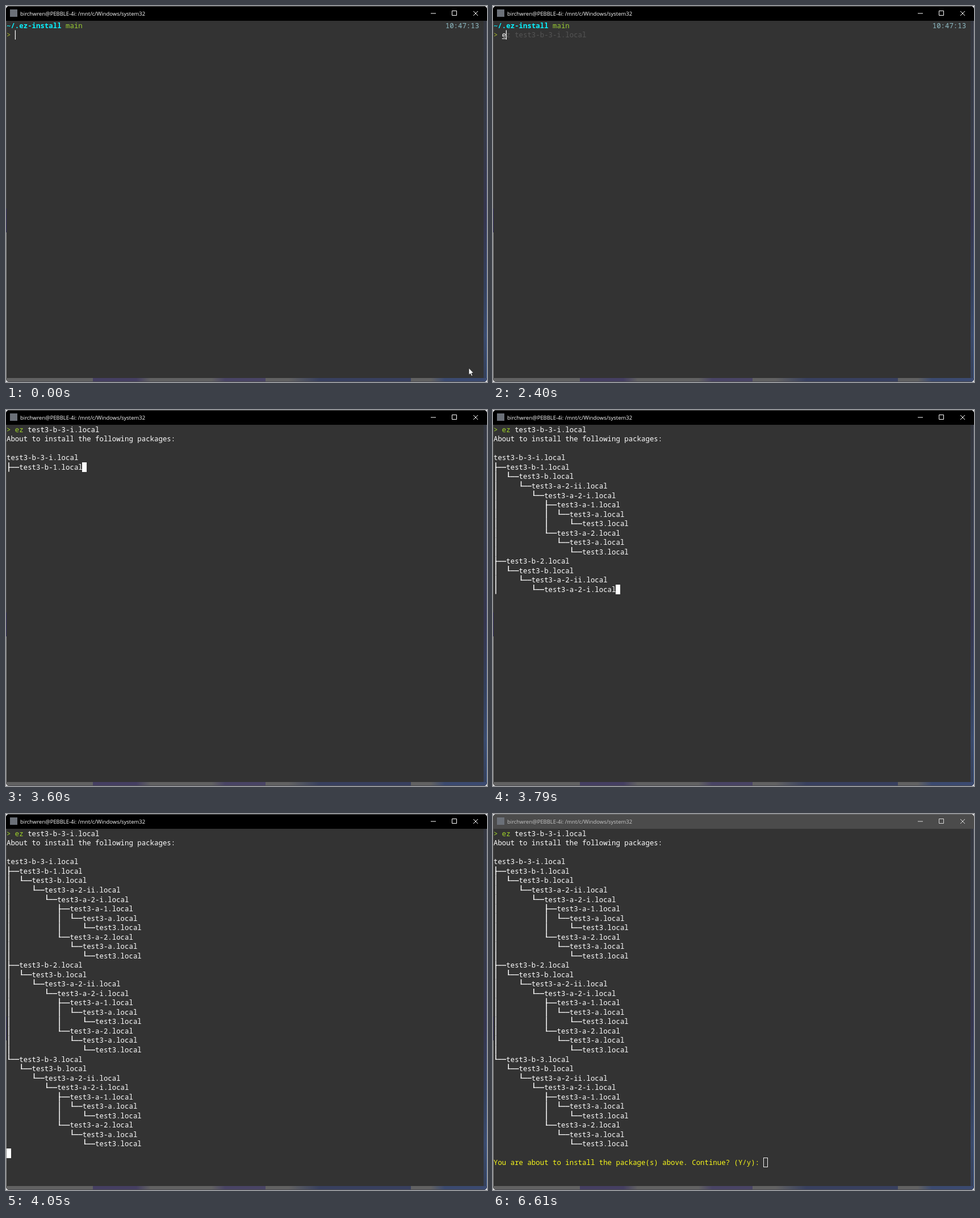
Animation, 847 px wide and 661 px high, one loop 6740 ms. Source, as an HTML page with a canvas:

```html
<!DOCTYPE html>
<html lang="en">
<head>
<meta charset="utf-8">
<title>Terminal</title>
<style>
html, body { margin: 0; width: 100%; height: 100%; overflow: hidden; background: #333; }
canvas { display: block; width: 847px; height: 661px; }
</style>
</head>
<body>
<canvas id="stage" width="847" height="661"></canvas>
<script>
const ctx = document.getElementById('stage').getContext('2d');
const W = 847, H = 661, LOOP = 6740;
const CELL = 7.43, ROW = 16.53, LEFT = 1, TOP = 26;
const MONO = '12.3px "Noto Sans Mono", "DejaVu Sans Mono", monospace';
const SANS = '500 9.45px "Open Sans", "Noto Sans", sans-serif';
const WHITE = '#fff', LIME = '#a2d729', DIM = '#555';

const colX = c => LEFT + c * CELL;
const rowY = r => TOP + r * ROW;

function rect(x, y, w, h, fill) {
  ctx.fillStyle = fill;
  ctx.fillRect(x, y, w, h);
}

function gradient(x0, y0, x1, y1, stops) {
  const g = ctx.createLinearGradient(x0, y0, x1, y1);
  stops.forEach(([at, color]) => g.addColorStop(at, color));
  return g;
}

// Box-drawing characters: does each stem reach below the middle, and does it have an arm?
const BOX = { '│': [1, 0], '├': [1, 1], '└': [0, 1] };

function drawBox(ch, x, y) {
  const mid = y + 8;
  if (ch === '─') return rect(x, mid, CELL, 1.3, WHITE);
  const [below, arm] = BOX[ch];
  const sx = x + 3.2;
  rect(sx, y, 1.5, below ? ROW : 9.3, WHITE);
  if (arm) rect(sx, mid, x + CELL - sx, 1.3, WHITE);
}

function print(text, col, row, color = WHITE, weight = '500') {
  ctx.font = weight + ' ' + MONO;
  [...text].forEach((ch, i) => {
    const x = colX(col + i), y = rowY(row);
    if (ch === '─' || BOX[ch]) return drawBox(ch, x, y);
    ctx.fillStyle = color;
    ctx.fillText(ch, x, y + 12.8);
  });
}

const branch = [
  '└──test3-b.local',
  '   └──test3-a-2-ii.local',
  '      └──test3-a-2-i.local',
  '         ├──test3-a-1.local',
  '         │  └──test3-a.local',
  '         │     └──test3.local',
  '         └──test3-a-2.local',
  '            └──test3-a.local',
  '               └──test3.local'
];
const output = ['', 'About to install the following packages:', '', 'test3-b-3-i.local'];
for (let i = 1; i <= 3; i++) {
  const last = i === 3;
  output.push((last ? '└' : '├') + `──test3-b-${i}.local`);
  branch.forEach(line => output.push((last ? '   ' : '│  ') + line));
}
output.push('');

const COMMAND = 'ez test3-b-3-i.local';
const QUESTION = 'You are about to install the package(s) above. Continue? (Y/y): ';

function bottomEdge() {
  const grey = '#626262';
  rect(0, 654, W, 7, grey);
  const patches = [
    [153, 255, '#453f62', grey], [362, 457, '#494465', '#494465'],
    [498, 713, '#38405f', '#38405f'], [748, 847, '#3b4a70', '#3b4a70']
  ];
  for (const [a, b, color, end] of patches) {
    const start = a === 153 ? color : grey;
    rect(a, 654, b - a, 7, gradient(a, 0, b, 0, [[0, start], [0.25, color], [0.75, color], [1, end]]));
  }
  rect(0, 660, W, 1, '#4a4a50');
}

function sideEdges() {
  rect(841, TOP, 6, 628, gradient(0, TOP, 0, 654, [
    [0, '#343740'], [0.3, '#353a48'], [0.55, '#35354e'], [0.75, '#34405c'], [0.88, '#3a4a6c'], [1, '#35405a']
  ]));
  rect(846, TOP, 1, 628, gradient(0, TOP, 0, 654, [[0, '#565a68'], [0.5, '#50567c'], [1, '#4a6aa0']]));
  rect(0, TOP, 1, 330, '#484848');
  rect(0, 356, 1, 42, '#3c3768');
  rect(0, 398, 1, 256, '#8c8c8c');
}

function titleBar(active) {
  rect(0, 0, W, TOP, active ? '#000' : '#4b4b4b');
  rect(0, 0, W, 1, active ? '#555' : '#686868');
  rect(7, 6, 13, 13, '#6b7078');
  ctx.font = SANS;
  ctx.fillStyle = active ? '#fff' : '#c6c6c6';
  ctx.fillText('birchwren@PEBBLE-4i: /mnt/c/Windows/system32', 25, 16.5);
  ctx.strokeStyle = active ? '#fff' : '#d8d8d8';
  ctx.lineWidth = 1;
  ctx.beginPath();
  ctx.moveTo(748, 13);
  ctx.lineTo(757, 13);
  ctx.rect(785.5, 8.5, 8, 8);
  ctx.moveTo(823, 9);
  ctx.lineTo(831, 17);
  ctx.moveTo(831, 9);
  ctx.lineTo(823, 17);
  ctx.stroke();
}

function pointer(x, y) {
  ctx.beginPath();
  [[0, 0], [0, 12], [2.7, 9.6], [4.7, 14], [6.6, 13.2], [4.8, 8.9], [8.3, 8.6]]
    .forEach(([dx, dy]) => ctx.lineTo(x + dx, y + dy));
  ctx.closePath();
  ctx.fillStyle = '#fff';
  ctx.fill();
  ctx.strokeStyle = '#111';
  ctx.lineWidth = 0.7;
  ctx.stroke();
}

function bar(col) {
  rect(Math.round(colX(col)) - 0.2, 42.5, 1.2, 16.5, '#fff');
}

function block(col, row) {
  rect(Math.floor(colX(col)), Math.floor(rowY(row)), 8, 17, '#fff');
}

function promptScreen(t) {
  print('~/.ez-install', 0, 0, '#08f2ff', 'bold');
  print('main', 14, 0, '#9acd32');
  print('10:47:13', 104, 0, '#8fbcc4');
  print('>', 0, 1, '#a9b82a');

  const typed = t < 2400 ? 0 : t < 2510 ? 1 : t < 2700 ? 2 : t < 3330 ? 3 : COMMAND.length;
  if (typed) {
    print(COMMAND.slice(0, Math.min(typed, 2)), 2, 1, typed > 1 ? LIME : WHITE);
    print(COMMAND.slice(2, typed), 4, 1);
    print(COMMAND.slice(typed), 2 + typed, 1, DIM);
    if (typed === 1) rect(colX(2), 57, CELL, 1, WHITE);
  }
  bar(2 + typed);
}

function lastRow(t) {
  if (t < 3597) return 1;
  const step = Math.min(14, Math.floor((t - 3597) / 32.14));
  return 4 + Math.round(step * 30 / 14);
}

function outputScreen(t) {
  const end = lastRow(t);
  print('>', 0, 0, LIME);
  print('ez', 2, 0, LIME);
  print(COMMAND.slice(3), 5, 0);
  for (let r = 1; r <= end; r++) print(output[r], 0, r);

  if (t < 5510) return block(output[end].length, end);
  print(QUESTION, 0, 35, '#f8f81a');
  if (t < 6610) return block(QUESTION.length, 35);
  ctx.strokeStyle = '#eee';
  ctx.lineWidth = 1;
  ctx.strokeRect(476.5, 604.5, 7, 16);
}

function draw(t) {
  rect(0, 0, W, H, '#e8e8ec');
  ctx.save();
  ctx.beginPath();
  ctx.roundRect(0, 0, W, H, 6);
  ctx.clip();
  rect(0, 0, W, H, '#333');
  bottomEdge();
  sideEdges();
  titleBar(t < 6610);
  if (t < 3560) promptScreen(t);
  else outputScreen(t);
  if (t < 30) pointer(815, 636.5);
  else if (t < 60) pointer(800, 643);
  else if (t < 80) pointer(777, 652);
  ctx.restore();
}

const start = performance.now();
function tick() {
  draw((performance.now() - start) % LOOP);
  requestAnimationFrame(tick);
}
tick();
</script>
</body>
</html>
```
